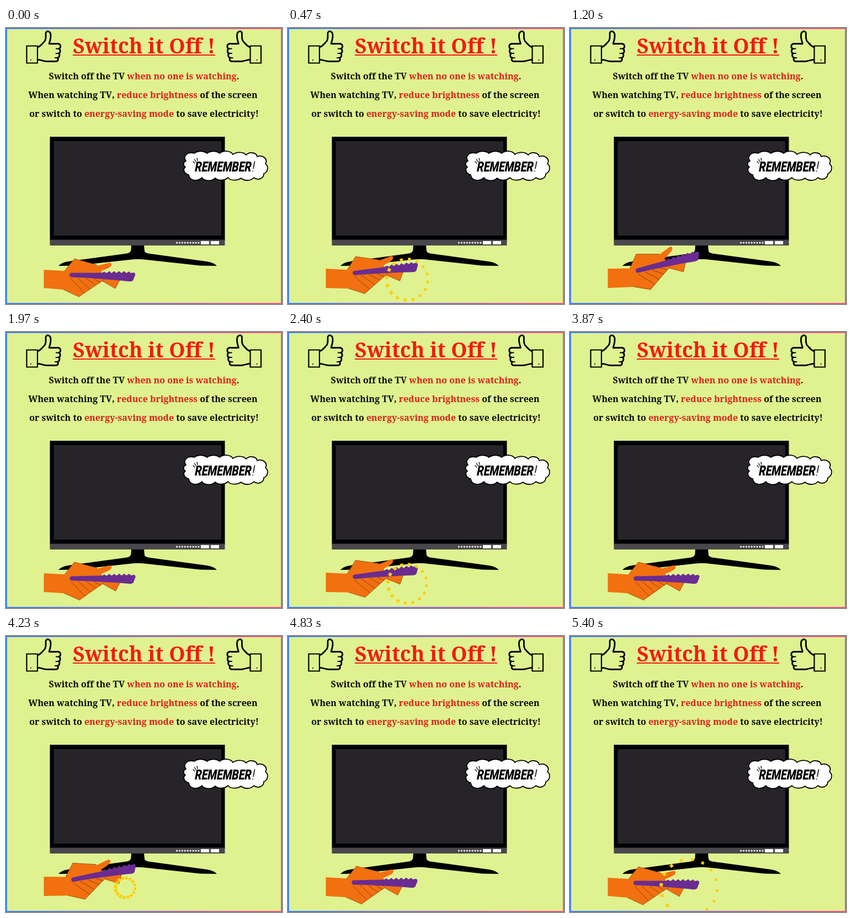
An HTML page for the animation above (5430 ms loop, 500 px wide and 500 px high).

```html
<!DOCTYPE html>
<html lang="en">
<head>
<meta charset="utf-8">
<title>Switch it Off</title>
<style>
  html, body { margin: 0; width: 100%; height: 100%; overflow: hidden; background: #dff28f; }
  svg { display: block; width: 100vw; height: 100vh; }
  .serif {
    font-family: "Noto Serif", serif; font-weight: 700; text-anchor: middle;
    font-kerning: none; font-variant-ligatures: none;
  }
  .title { font-size: 37.33px; fill: #f41a12; }
  .body { font-size: 16px; fill: #0a0a08; }
  .red { fill: #dc201a; }
  .lettering { font: italic 900 25.500px Roboto, sans-serif; }
  .line { fill: none; stroke: #000; stroke-linejoin: round; stroke-linecap: round; }
  .skin { fill: #f2700f; stroke: #6b3a10; stroke-width: .6; stroke-linejoin: round; }
  .crease { fill: none; stroke: #7a3a0c; stroke-width: .8; }
</style>
</head>
<body>
<svg viewBox="0 0 500 500">
  <defs>
    <linearGradient id="edge" gradientUnits="userSpaceOnUse" x1="0" y1="0" x2="500" y2="0">
      <stop offset="0" stop-color="#3f83f5"/>
      <stop offset=".5" stop-color="#9a6bc8"/>
      <stop offset="1" stop-color="#f2528c"/>
    </linearGradient>
    <clipPath id="stickerBox"><rect x="68" y="392" width="202" height="106"/></clipPath>
    <g id="thumbsUp" class="line" stroke-width="2.800">
      <path d="M57 32.500H37.500V63.500H57Z" stroke-width="2.200" stroke-linejoin="miter"/>
      <path d="M58 34.500C64 32 66 28 70 24C73 20 72 15 72 9.500C72.500 4 80.500 5 81 12.500C81.500 19 79.500 24 78 28.500H94C100 29 100 36.500 95.500 37.500C99.500 39 99 45.500 95 46C98 47.500 97.500 53.500 93 54C95.500 56 94.500 60.500 90 60.500H74C68 60.500 64 57.500 58 57.500"/>
      <path d="M91 37.500H95.500M90.500 46H95M89 54H93" stroke-width="2.200"/>
      <circle cx="45" cy="58" r="1.100" fill="#000" stroke="none"/>
    </g>
  </defs>

  <rect width="500" height="500" fill="#dff28f"/>
  <rect x="1" y="1" width="498" height="498" fill="none" stroke="url(#edge)" stroke-width="2"/>

  <use href="#thumbsUp"/>
  <use href="#thumbsUp" transform="matrix(-1 0 0 1 499.500 0)"/>

  <text class="serif title" x="250" y="46">Switch it Off !</text>
  <rect x="121" y="48" width="258" height="2" fill="#f41a12"/>
  <text class="serif body" x="250" y="93">Switch off the TV <tspan class="red">when no one is watching</tspan>.</text>
  <text class="serif body" x="248" y="127">When watching TV, <tspan class="red">reduce brightness</tspan> of the screen</text>
  <text class="serif body" x="250" y="161">or switch to <tspan class="red">energy-saving mode</tspan> to save electricity!</text>

  <g id="tv">
    <path d="M227 393H250L251 404Q252 407.500 258 408.500L364 423Q377 425 382 431L352 430.500L251 419.500Q239 418 227 419.500L126 430.500L95 431Q100 425 112 423L219 408.500Q226 407 226.500 402Z"/>
    <rect x="79.500" y="197" width="317" height="188"/>
    <rect x="86.500" y="205" width="303.500" height="171" fill="#262429"/>
    <rect x="79.500" y="383.500" width="317" height="10.500" fill="#4a474c"/>
    <path d="M309.500 389H350" stroke="#fff" stroke-width="3.200" stroke-linecap="round" stroke-dasharray="0 4.930"/>
    <path d="M353 386H368V392H353ZM371 386H386V392H371Z" fill="#fff"/>
  </g>

  <g id="cloud">
    <path class="line" style="fill:#fff" stroke-width="1.800" d="M326 241C320 233 328 223 341 227C347 222 358 222 364 227C371 222 381 222 387 227C394 221 407 222 411 229C418 224 430 224 435 230C442 223 454 226 455 233C466 229 475 238 470 246C476 250 475 261 467 264C467 273 456 277 449 271C443 278 431 277 426 272C419 277 407 277 402 271C396 277 384 277 379 272C372 279 358 277 355 271C347 279 332 277 331 266C322 264 320 255 325 252C320 248 321 243 326 241Z"/>
    <text class="lettering" transform="translate(342 260) skewX(-3) scale(.77 1)">REMEMBER</text>
    <path class="line" stroke-width="1.500" d="M450.500 242L448 254.500M447 259V259.500"/>
    <path class="line" stroke-width="1.300" d="M339 242L342 245M341.500 238L344 242M346 236L347 240"/>
  </g>

  <g clip-path="url(#stickerBox)">
    <path id="sleeve" fill="#f2700f"/>
    <g id="hand">
      <path class="skin" d="M172 457L198 472L206 457L190 448Z"/>
      <path class="skin" d="M106 440L124 418L164 429L172 441L178 456L160 468L132 487L104 474"/>
      <path class="crease" d="M117 453L142 480M130 453L152 473M144 453L162 466M159 454L171 461"/>
      <path id="thumb" fill="#f2700f" d="M138 423L166 430.500L187 425.500Q192.500 425 191 430Q189 433.500 182 436.500L168 442L158 446H138Z"/>
      <path fill="#6a2c91" d="M118.500 443.500H174L178 441.500L182 444L187 440.500L191 444L196 440.500L200 444L205 440.500L209 444L214 440.500L218 444L223 441L226 444L231 443Q235 444 234 448L230 457.500Q227 460 222 459L202 457L170 454.500L144 452.500L119 451.500Q115 451 115 447.500Q115 444 118.500 443.500Z"/>
    </g>
    <g id="sparks" fill="#fccf0c"></g>
  </g>
</svg>
<script>
  const LOOP = 5430, PRESS_TIME = 600;
  const PRESSES = [30, 1000, 1970, 2930, 3870, 4830];
  const PIVOT = { x: 91, y: 429 };
  const REST = [0, 0, 0, 0];
  // [ms, rotation, dx, dy, thumb lift]
  const POSES = [
    [0, -1, 0, -.5, 0],
    [100, -8, 2, -8, -11],
    [200, -15.5, 0, 0, -8],
    [260, -16, 0, 0, 0],
    [330, -14, 0, 0, 0],
    [560, 0, 0, 0, 0]
  ];
  const BURST = { x: 216, y: 456, radius: 51, count: 16, start: 300, end: 570 };

  const byId = id => document.getElementById(id);
  const hand = byId('hand'), thumb = byId('thumb'), sleeve = byId('sleeve'), sparks = byId('sparks');

  for (let i = 0; i < BURST.count; i++) {
    sparks.append(document.createElementNS('http://www.w3.org/2000/svg', 'rect'));
  }

  function poseAt(ms) {
    const next = POSES.findIndex(p => p[0] > ms);
    if (next < 1) return REST;
    const a = POSES[next - 1], b = POSES[next];
    const k = (ms - a[0]) / (b[0] - a[0]);
    return a.slice(1).map((v, i) => v + (b[i + 1] - v) * k);
  }

  function drawHand([angle, dx, dy, lift]) {
    const rad = angle * Math.PI / 180, c = Math.cos(rad), s = Math.sin(rad);
    const place = (x, y) => {
      const u = x - PIVOT.x, v = y - PIVOT.y;
      return `${PIVOT.x + dx + u * c - v * s} ${PIVOT.y + dy + u * s + v * c}`;
    };
    hand.setAttribute('transform', `translate(${dx} ${dy}) rotate(${angle} ${PIVOT.x} ${PIVOT.y})`);
    thumb.setAttribute('transform', `rotate(${lift} 160 436)`);
    const top = 438 + Math.max(angle, -2);
    sleeve.setAttribute('d',
      `M68.5 ${top}L${place(106, 440)}L${place(114, 441)}L${place(112, 477)}L${place(104, 474)}L68.5 471Z`);
  }

  function drawSparks(ms) {
    const visible = ms >= BURST.start && ms < PRESS_TIME;
    sparks.setAttribute('visibility', visible ? 'visible' : 'hidden');
    if (!visible) return;
    const k = Math.min(1, (ms - BURST.start) / (BURST.end - BURST.start));
    const radius = BURST.radius * Math.sin(k * Math.PI / 2);
    [...sparks.children].forEach((spark, i) => {
      const deg = 6 + i * 360 / BURST.count;
      const size = 5.2 - Math.cos(deg * Math.PI / 180) * .6;
      spark.setAttribute('x', radius - size / 2);
      spark.setAttribute('y', -size / 2);
      spark.setAttribute('width', size);
      spark.setAttribute('height', size);
      spark.setAttribute('transform', `translate(${BURST.x} ${BURST.y}) rotate(${deg})`);
    });
  }

  const origin = performance.now();
  function draw() {
    const time = Math.max(0, performance.now() - origin) % LOOP;
    const start = PRESSES.filter(p => p <= time).pop();
    const ms = start === undefined ? PRESS_TIME : time - start;
    drawHand(ms < PRESS_TIME ? poseAt(ms) : REST);
    drawSparks(ms);
    requestAnimationFrame(draw);
  }
  draw();
</script>
</body>
</html>
```
